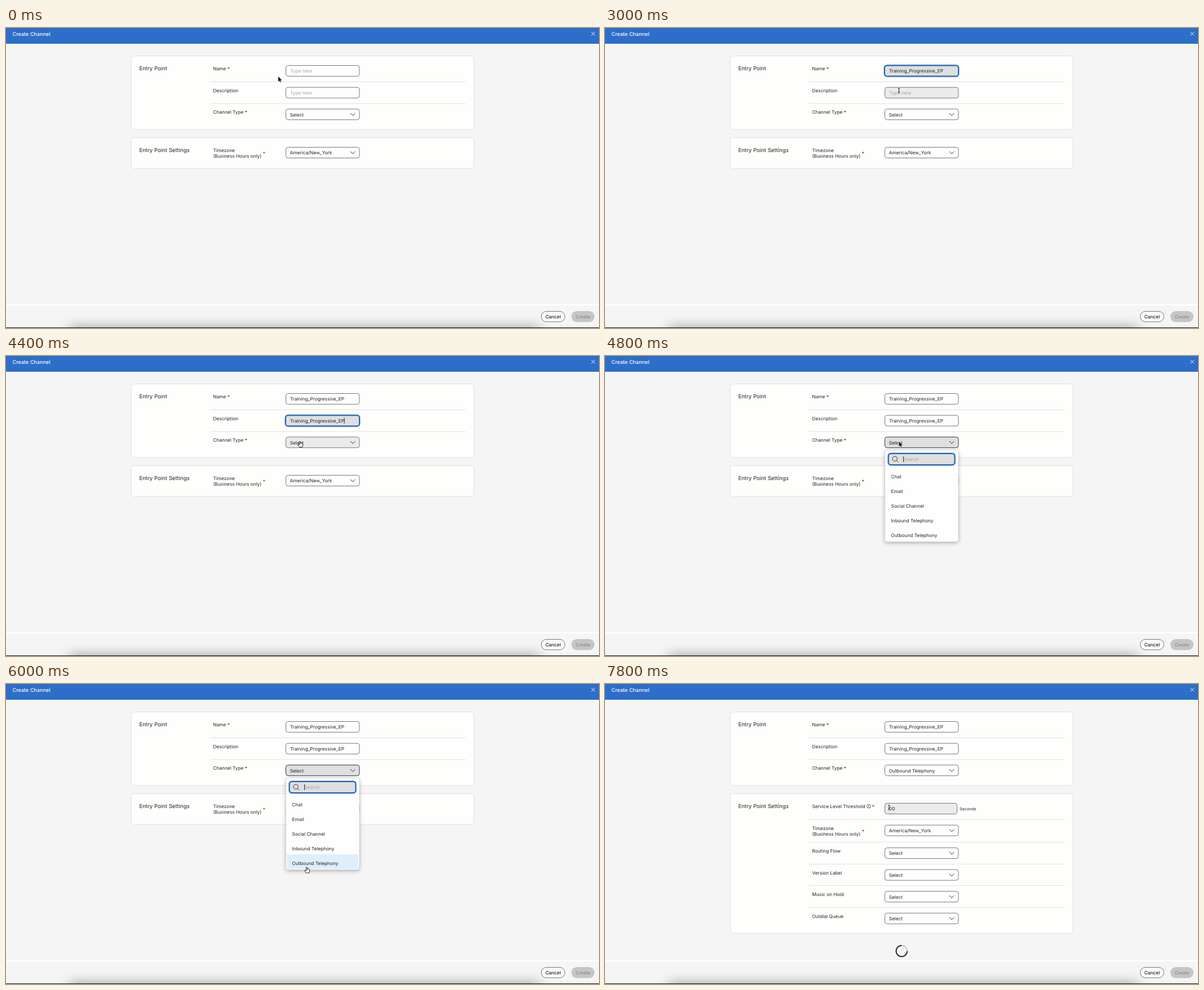
Write an HTML page with a canvas that moves like this. It is 1052 px wide and 532 px high and loops after 8 s.

```html
<!DOCTYPE html>
<html lang="en">
<head>
<meta charset="utf-8">
<title>Create Channel</title>
<style>
html, body { margin: 0; width: 100%; height: 100%; overflow: hidden; background: #f5f5f5; }
canvas { display: block; }
</style>
</head>
<body>
<canvas id="stage" width="1052" height="532"></canvas>
<script>
const ctx = document.getElementById('stage').getContext('2d');
const LOOP = 8000, STEP = 200, BODY = 8.28;
const ENTRY = 'Training_Progressive_EP';
const INK = '#222', RED = '#b0213a', MUTED = '#a6a6a6';
const CHANNELS = ['Chat', 'Email', 'Social Channel', 'Inbound Telephony', 'Outbound Telephony'];

// Moments at which the form changes state
const AT = { nameFocus: 1000, namePaste: 1200, descFocus: 3200, descPaste: 4000, open: 4800, chosen: 6400 };

// Pointer hot spot: time, x, y
const PATH = [
  [0, 483, 86], [200, 483, 86], [800, 516, 78.5], [2400, 516, 78.5], [3000, 521.5, 111],
  [4000, 521.5, 111], [4400, 521.5, 151.5], [5000, 521.5, 151.5], [5800, 533.5, 325],
  [6600, 533.5, 325], [7400, 586, 221], [7800, 504, 219], [8000, 504, 219]
];

function pointerAt(t) {
  const i = Math.max(1, PATH.findIndex(p => p[0] > t));
  const [t0, x0, y0] = PATH[i - 1], [t1, x1, y1] = PATH[i];
  const u = (t - t0) / (t1 - t0), e = u * u * (3 - 2 * u);
  return { x: x0 + (x1 - x0) * e, y: y0 + (y1 - y0) * e };
}

const inside = (p, x, y, w, h) => p.x >= x && p.x <= x + w && p.y >= y && p.y <= y + h;
const blink = (t, start) => (t - start + LOOP) % 1000 < 500;

function text(str, x, mid, { size = BODY, weight = 400, color = INK, align = 'left' } = {}) {
  ctx.font = `${weight} ${size}px Inter, sans-serif`;
  ctx.textAlign = align;
  ctx.fillStyle = color;
  ctx.fillText(str, x, mid + size * 0.364);
  return ctx.measureText(str).width;
}

function box(x, y, w, h, r, fill, stroke, width = 1) {
  ctx.beginPath();
  ctx.roundRect(x, y, w, h, r);
  if (fill) { ctx.fillStyle = fill; ctx.fill(); }
  if (stroke) { ctx.strokeStyle = stroke; ctx.lineWidth = width; ctx.stroke(); }
}

function line(points, color, width = 1) {
  ctx.beginPath();
  points.forEach(([x, y]) => ctx.lineTo(x, y));
  ctx.strokeStyle = color;
  ctx.lineWidth = width;
  ctx.stroke();
}

function divider(y) {
  ctx.setLineDash([1, 1]);
  line([[362, y], [816, y]], '#c4c4c4');
  ctx.setLineDash([]);
}

function focusBox(x, y, w, h) {
  box(x, y, w, h, 4.5, null, '#a9cdf3', 4);
  box(x, y, w, h, 4.5, '#dfdfdf', '#2363b5', 2);
}

const caret = (x, mid) => line([[x, mid - 5], [x, mid + 5]], '#111', 0.9);
const star = (x, mid) => text('*', x, mid + 0.8, { size: 9.5, color: RED, align: 'center' });

function field(mid, pointer, { value, hint = 'Type here', focus, caretOn, width = 131 }) {
  const y = mid - 9.5;
  const hover = inside(pointer, 496, y, width, 19);
  if (focus) focusBox(496, y, width, 19);
  else box(496.5, y, width - 0.5, 19, 4, hover ? '#ebebec' : '#fefefe', '#777');
  const w = text(value || hint, 504, mid + 0.3, { color: value ? INK : MUTED });
  if (caretOn) caret(504 + (value ? w + 0.3 : 0), mid);
}

function select(mid, pointer, value = 'Select', open = false) {
  const y = mid - 9.5;
  const hover = inside(pointer, 496, y, 131, 19);
  box(496.5, y, 130.5, 19, 4, open ? '#dfdfdf' : hover ? '#ebebec' : '#fefefe', open ? '#333' : '#777');
  text(value, 503.7, mid + 0.3);
  line([[611, mid - 2.2], [615.2, mid + 2.2], [619.4, mid - 2.2]], '#333', 1);
}

function page() {
  ctx.fillStyle = '#fff';
  ctx.fillRect(0, 0, 1052, 532);
  box(0, 29, 1052, 461, [10, 10, 0, 0], '#f5f5f5');
  ctx.fillStyle = '#2d6ec8';
  ctx.fillRect(0, 0, 1052, 28);
  text('Create Channel', 11.5, 11, { size: 9.1, weight: 500, color: '#fff' });
  line([[1038.3, 6.8], [1045, 13.5]], '#fff', 0.9);
  line([[1045, 6.8], [1038.3, 13.5]], '#fff', 0.9);

  ctx.fillStyle = '#f5f5f5';
  ctx.fillRect(0, 492, 1052, 40);
  ctx.save();
  ctx.shadowColor = 'rgba(0,0,0,.38)';
  ctx.shadowBlur = 22;
  ctx.fillStyle = '#555';
  ctx.fillRect(112, 531, 834, 20);
  ctx.restore();
  ctx.fillStyle = '#111';
  ctx.fillRect(0, 531, 1052, 1);
  box(949.5, 502.5, 42, 18.5, 9.25, '#f9f9f9', '#777');
  text('Cancel', 970.5, 512, { size: 8.3, weight: 500, align: 'center' });
  box(1003, 502, 41, 19.5, 9.75, '#c5c5c5');
  text('Create', 1023.6, 512, { size: 8.1, weight: 500, color: '#8c8c8c', align: 'center' });
}

function entryCard(t, pointer) {
  const nameFocus = t >= AT.nameFocus && t < AT.descFocus;
  const descFocus = t >= AT.descFocus && t < AT.open;
  box(222.5, 49.5, 607.5, 130.5, 5, '#fefefd', '#e0e0e0');
  text('Entry Point', 236.4, 71.7, { size: 9.65 });
  text('Name', 367.5, 72);
  star(395, 72);
  text('Description', 367.5, 110.7);
  text('Channel Type', 367.5, 149.2);
  star(426, 149);
  divider(95.5);
  divider(134);
  field(76, pointer, {
    value: t >= AT.namePaste && ENTRY, focus: nameFocus,
    caretOn: nameFocus && blink(t, AT.namePaste - 100)
  });
  field(114.7, pointer, {
    value: t >= AT.descPaste && ENTRY, focus: descFocus,
    caretOn: descFocus && blink(t, AT.descPaste)
  });
  const open = t >= AT.open && t < AT.chosen;
  select(153.2, pointer, t >= AT.chosen ? CHANNELS[4] : 'Select', open);
}

function timezone(mid, pointer) {
  text('Timezone', 367.5, mid - 4);
  text('(Business Hours only)', 367.5, mid + 6.4);
  star(458, mid + 1);
  select(mid, pointer, 'America/New_York');
}

function threshold(pointer) {
  text('Service Level Threshold', 367.5, 217);
  ctx.beginPath();
  ctx.arc(467.8, 216.8, 3.3, 0, 7);
  ctx.strokeStyle = '#333';
  ctx.lineWidth = 0.8;
  ctx.stroke();
  line([[467.8, 216.4], [467.8, 218.8]], '#333', 0.9);
  line([[467.8, 214.7], [467.8, 215.5]], '#333', 0.9);
  star(476, 217);
  field(221, pointer, { value: '00', width: 128.5 });
  text('Seconds', 629, 221.3, { size: 7.2 });
}

function settingsCard(t, pointer) {
  const full = t >= AT.chosen;
  box(222.5, 194.5, 607.5, full ? 247.5 : 54.5, 5, '#fefefd', '#e0e0e0');
  text('Entry Point Settings', 236.4, 216.7, { size: 9.65 });
  if (!full) return timezone(221, pointer);
  threshold(pointer);
  divider(240.5);
  timezone(259.7, pointer);
  ['Routing Flow', 'Version Label', 'Music on Hold', 'Outdial Queue'].forEach((label, i) => {
    const mid = 300 + i * 38.6;
    divider(Math.round(mid - 20) + 0.5);
    text(label, 367.5, mid - 4);
    select(mid, pointer);
  });
  const turn = (t - 7800) / 1000 * Math.PI * 2;
  ctx.lineWidth = 2;
  ctx.strokeStyle = '#c8c8c8';
  ctx.beginPath();
  ctx.arc(526.3, 473.5, 9.8, 0, 7);
  ctx.stroke();
  ctx.strokeStyle = '#333';
  ctx.beginPath();
  ctx.arc(526.3, 473.5, 9.8, turn, turn + Math.PI * 1.5);
  ctx.stroke();
}

function dropdown(t, pointer) {
  ctx.save();
  ctx.shadowColor = 'rgba(0,0,0,.3)';
  ctx.shadowBlur = 7;
  ctx.shadowOffsetY = 2;
  box(496.5, 166.5, 130.5, 163, 4, '#fefefe');
  ctx.restore();
  box(496.5, 166.5, 130.5, 163, 4, null, '#cfcfcf', 0.7);
  focusBox(502.8, 173, 117.6, 20);
  ctx.beginPath();
  ctx.arc(514.2, 182.2, 4.2, 0, 7);
  ctx.strokeStyle = '#333';
  ctx.lineWidth = 1;
  ctx.stroke();
  line([[517.2, 185.2], [520.3, 188.3]], '#333');
  text('Search', 529, 183.2, { color: MUTED });
  if (blink(t, AT.open)) caret(529.5, 183);
  CHANNELS.forEach((label, i) => {
    const mid = 213.6 + i * 26.1;
    if (inside(pointer, 498.5, mid - 13, 126.5, i === 4 ? 27 : 26)) {
      box(498.5, mid - 16, 126.5, 26, 0, '#dfeefb');
    }
    text(label, 507.6, mid);
  });
}

function pointerKind(t, p) {
  const over = (mid) => inside(p, 496, mid - 9.5, 131, 19);
  if (over(76) || over(114.7)) return 'beam';
  if (t >= AT.open && t < AT.chosen) {
    if (inside(p, 502, 172, 119, 22)) return 'beam';
    return inside(p, 497, 200, 130, 130) ? 'hand' : 'arrow';
  }
  if (over(153.2)) return 'hand';
  if (t < AT.chosen) return 'arrow';
  if (over(221)) return 'beam';
  return [259.7, 300, 338.6, 377.2, 415.8].some(over) ? 'hand' : 'arrow';
}

const SHAPES = {
  arrow: new Path2D('M0 0V9.2L2.1 7.3L3.6 10.3L5 9.6L3.6 6.8H6.5Z'),
  hand: new Path2D('M-1 1Q-1-.3 0-.3T1 1V3.7Q3-.1 3.6 4Q5.4 3.7 5.2 6L4.4 10H-1.2L-3.6 6.5Q-3.8 5-2.2 5.3L-1 6.5Z'),
  beam: new Path2D('M-1.8-4.3Q0-4.3 0-3V3Q0 4.3-1.8 4.3M1.8-4.3Q0-4.3 0-3M0 3Q0 4.3 1.8 4.3M-1.2 1.6H1.2')
};

function drawPointer(kind, p) {
  const shape = SHAPES[kind];
  ctx.save();
  ctx.translate(p.x, p.y);
  ctx.lineJoin = 'round';
  if (kind === 'hand') {
    ctx.fillStyle = '#fff';
    ctx.fill(shape);
    ctx.strokeStyle = '#111';
    ctx.lineWidth = 0.9;
    ctx.stroke(shape);
    line([[1, 4], [1, 5.5]], '#111', 0.7);
  } else {
    ctx.strokeStyle = '#fff';
    ctx.lineWidth = kind === 'arrow' ? 1.4 : 2;
    ctx.stroke(shape);
    ctx.fillStyle = ctx.strokeStyle = '#111';
    ctx.lineWidth = 1;
    if (kind === 'arrow') ctx.fill(shape);
    else ctx.stroke(shape);
  }
  ctx.restore();
}

function render(now) {
  const t = Math.floor(now % LOOP / STEP) * STEP;
  const p = pointerAt(t);
  ctx.textRendering = 'geometricPrecision';
  page();
  entryCard(t, p);
  settingsCard(t, p);
  if (t >= AT.open && t < AT.chosen) dropdown(t, p);
  drawPointer(pointerKind(t, p), p);
}

const start = performance.now();
function tick() {
  render(performance.now() - start);
  requestAnimationFrame(tick);
}
tick();
</script>
</body>
</html>
```
